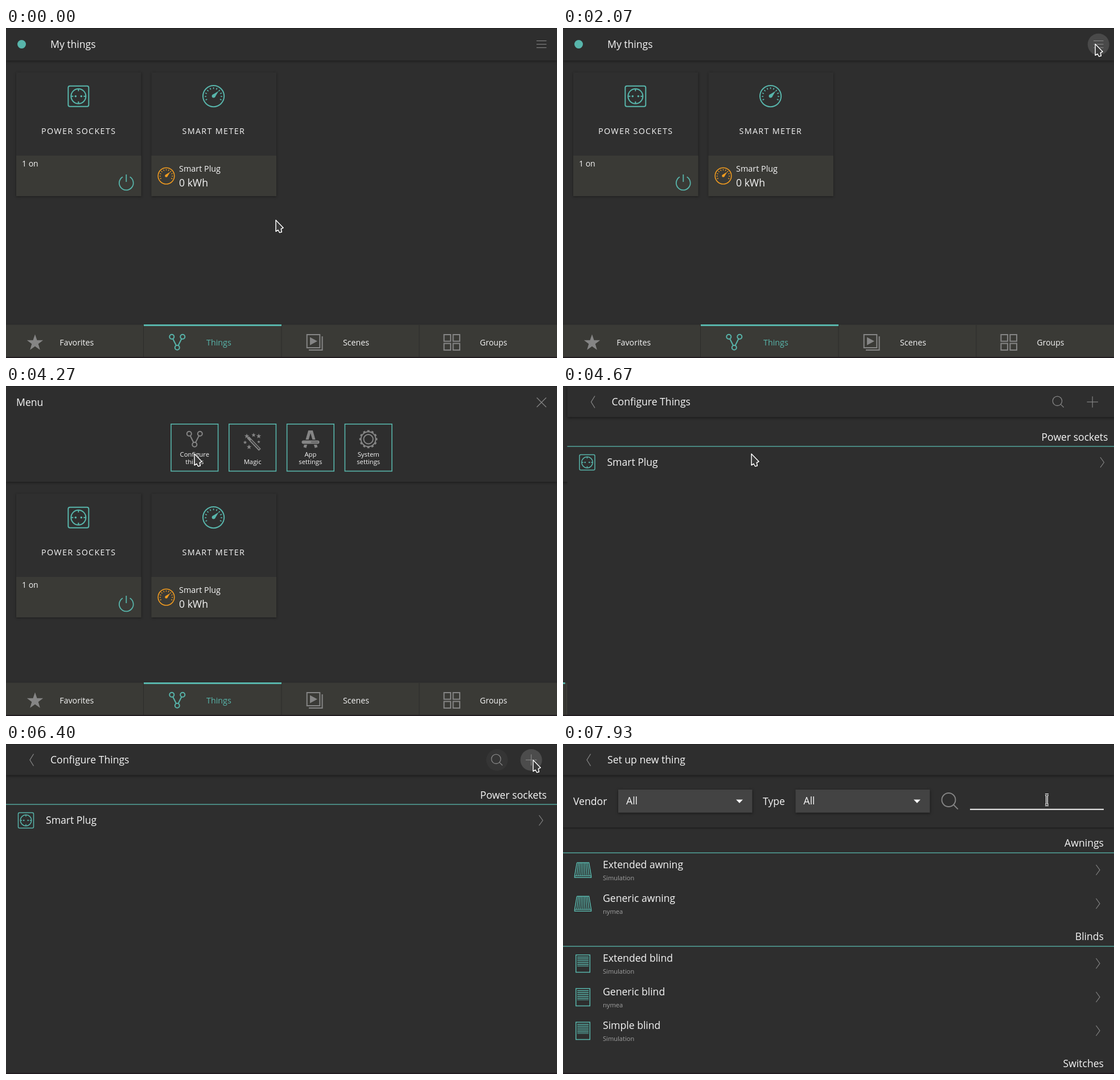
Write an HTML page with a canvas that moves like this. It is 968x579 px and loops after 8000 ms.

```html
<!DOCTYPE html>
<html lang="en">
<head>
<meta charset="utf-8">
<title>Smart home setup</title>
<style>
html, body { margin: 0; width: 100%; height: 100%; overflow: hidden; background: #2e2e2e; }
canvas { display: block; }
</style>
</head>
<body>
<canvas id="stage" width="968" height="579"></canvas>
<script>
const W = 968, H = 579, LOOP = 8000;
const ctx = document.getElementById('stage').getContext('2d');
const BG = '#2e2e2e', PANEL = '#3a3a36', TEAL = '#58b5ab', ORANGE = '#f39c1f';
const GRAY = '#858585', WHITE = '#f6f6f6';
const FONT = '"Open Sans", "Noto Sans", sans-serif';

const clamp = v => Math.max(0, Math.min(1, v));
const span = (t, a, b) => clamp((t - a) / (b - a));
const smooth = p => p * p * (3 - 2 * p);
const outCubic = p => 1 - (1 - p) ** 3;

function text(s, x, y, size = 17.6, color = WHITE, align = 'left', spacing = 0) {
  ctx.font = size + 'px ' + FONT;
  ctx.letterSpacing = spacing + 'px';
  ctx.textAlign = align;
  ctx.fillStyle = color;
  ctx.fillText(s, x, y);
}

function rect(x, y, w, h, color) {
  ctx.fillStyle = color;
  ctx.fillRect(x, y, w, h);
}

function box(x, y, w, h, color, lw = 2) {
  ctx.strokeStyle = color;
  ctx.lineWidth = lw;
  ctx.strokeRect(x, y, w, h);
}

function line(color, lw, ...p) {
  ctx.strokeStyle = color;
  ctx.lineWidth = lw;
  ctx.beginPath();
  for (let i = 0; i < p.length; i += 2) ctx.lineTo(p[i], p[i + 1]);
  ctx.stroke();
}

function poly(color, ...p) {
  ctx.fillStyle = color;
  ctx.beginPath();
  for (let i = 0; i < p.length; i += 2) ctx.lineTo(p[i], p[i + 1]);
  ctx.closePath();
  ctx.fill();
}

function ring(x, y, r, color, lw = 2, a = 0, b = Math.PI * 2) {
  ctx.strokeStyle = color;
  ctx.lineWidth = lw;
  ctx.beginPath();
  ctx.arc(x, y, r, a, b);
  ctx.stroke();
}

function dot(x, y, r, color) {
  ctx.fillStyle = color;
  ctx.beginPath();
  ctx.arc(x, y, r, 0, Math.PI * 2);
  ctx.fill();
}

function star(x, y, r, color, inner = 0.42) {
  const p = [];
  for (let i = 0; i < 10; i++) {
    const a = -Math.PI / 2 + i * Math.PI / 5, d = i % 2 ? r * inner : r;
    p.push(x + d * Math.cos(a), y + d * Math.sin(a));
  }
  poly(color, ...p);
}

function at(x, y, k, draw) {
  ctx.save();
  ctx.translate(x, y);
  ctx.scale(k, k);
  draw();
  ctx.restore();
}

function shaded(x, y, w, h, color, blur = 5, alpha = 0.5) {
  ctx.save();
  ctx.shadowColor = `rgba(0,0,0,${alpha})`;
  ctx.shadowBlur = blur;
  ctx.shadowOffsetY = 1;
  rect(x, y, w, h, color);
  ctx.restore();
}

// Icons
const socket = (x, y, k) => at(x, y, k, () => {
  ctx.strokeStyle = TEAL;
  ctx.lineWidth = 2;
  ctx.beginPath();
  ctx.roundRect(-18, -18, 36, 36, 3);
  ctx.stroke();
  ring(0, 0, 13, TEAL);
  for (let i = 0; i < 4; i++) {
    const c = Math.cos(i * Math.PI / 2), s = Math.sin(i * Math.PI / 2);
    line(TEAL, 2, 9 * c, 9 * s, 13 * c, 13 * s);
  }
  dot(-5, 0, 1.8, TEAL);
  dot(5, 0, 1.8, TEAL);
});

const gauge = (x, y, k, color) => at(x, y, k, () => {
  ring(0, 0, 18.6, color);
  for (let i = 0; i <= 10; i++) {
    const a = Math.PI * (0.86 + i * 0.128);
    const c = Math.cos(a), s = Math.sin(a);
    line(color, 1.6, 12.5 * c, 12.5 * s, 15.5 * c, 15.5 * s);
  }
  poly(color, 9, -9, 2.6, 1.6, -1.6, -2.6);
  dot(0, 0, 3, color);
});

const nodes = (x, y, color) => at(x, y, 1, () => {
  ring(-9.5, -9.5, 4, color);
  ring(9.5, -9.5, 4, color);
  ring(0, 9.5, 4, color);
  line(color, 2, -7.7, -6, -1.7, 6);
  line(color, 2, 7.7, -6, 1.7, 6);
});

function power(x, y) {
  ring(x, y, 12.4, TEAL, 1.8, -Math.PI * 0.33, Math.PI * 1.33);
  line(TEAL, 1.8, x, y - 15, x, y - 2);
}

function wand(x, y) {
  line(GRAY, 5, x - 8, y - 7, x + 13, y + 15);
  line(BG, 1.6, x - 3, y - 2, x + 12, y + 13.5);
  star(x - 10, y - 9, 4.5, GRAY);
  star(x + 2, y - 11, 4, GRAY);
  star(x + 11, y - 9, 4.5, GRAY);
  star(x - 13, y + 2, 3.5, GRAY);
  star(x - 6, y + 10, 4.5, GRAY);
  star(x + 11, y + 1, 3, GRAY);
}

function letterA(x, y) {
  line(GRAY, 5, x - 10, y + 15, x - 2, y - 12.5, x + 2, y - 12.5, x + 10, y + 15);
  rect(x - 16, y + 1, 32, 9, BG);
  ctx.fillStyle = GRAY;
  ctx.beginPath();
  ctx.roundRect(x - 15.5, y + 2.5, 31, 6, 3);
  ctx.fill();
  rect(x + 1, y + 4, 12, 3, '#6c6c6c');
}

function gear(x, y) {
  ring(x, y, 13, GRAY, 2);
  ring(x, y, 8.2, GRAY, 2);
  for (let i = 0; i < 12; i++) {
    const a = i * Math.PI / 6;
    ring(x, y, 14.6, GRAY, 2.6, a - 0.13, a + 0.13);
  }
}

function search(x, y, k) {
  at(x, y, k, () => {
    ring(0, 0, 8.2, GRAY, 1.3);
    line(GRAY, 1.3, 5.8, 5.8, 11.2, 11.2);
  });
}

function awning(y) {
  line(TEAL, 1.5, 24.5, y - 13, 45.5, y - 13, 49.5, y + 10, 49.5, y + 13, 20.5, y + 13, 20.5, y + 10, 24.5, y - 13);
  line(TEAL, 1.2, 20.5, y + 10, 49.5, y + 10);
  for (let i = 1; i < 8; i++) line(TEAL, 1.4, 24.5 + i * 2.62, y - 13, 20.5 + i * 3.62, y + 10);
}

function blind(y) {
  box(22.7, y - 15.2, 24.6, 30.4, TEAL, 1.5);
  for (let i = 0; i < 5; i++) line(TEAL, 1.5, 25, y - 11.5 + i * 3.3, 45, y - 11.5 + i * 3.3);
  line(TEAL, 1, 25, y + 4.5, 45, y + 4.5);
}

const back = () => line(GRAY, 1.3, 48.5, 17.5, 42, 28, 48.5, 38.5);
const chevron = y => line(GRAY, 1.2, 936.5, y - 9, 943, y, 936.5, y + 9);
const halo = (x, y, a) => { if (a > 0) dot(x, y, 19, `rgba(255,255,255,${a})`); };

// Pages
function tiles(dy) {
  for (const x of [18, 255.5]) {
    shaded(x, 78 + dy, 219.5, 217, '#2f2f2f', 4, 0.4);
    rect(x, 224 + dy, 219.5, 71, PANEL);
  }
  socket(127.3, 119.8 + dy, 1);
  text('POWER SOCKETS', 62, 186 + dy, 14.3, WHITE, 'left', 1.35);
  text('1 on', 28, 242.5 + dy, 14);
  power(211.3, 272 + dy);
  gauge(364.6, 119.6 + dy, 1, TEAL);
  text('SMART METER', 309.5, 186 + dy, 14.3, WHITE, 'left', 1.35);
  gauge(281.5, 259.5 + dy, 0.77, ORANGE);
  text('Smart Plug', 304, 251.7 + dy, 14.4);
  text('0 kWh', 304, 277.7 + dy, 17.6);
}

function menuButtons() {
  const labels = [['Configure', 'things'], ['', 'Magic'], ['App', 'settings'], ['System', 'settings']];
  labels.forEach(([a, b], i) => {
    const x = 331.3 + i * 101.8;
    box(x - 41.3, 66.8, 82.6, 82.6, TEAL, 1.6);
    text(a, x, 124, 11.3, WHITE, 'center');
    text(b, x, i === 1 ? 136.5 : 137.3, 11.3, WHITE, 'center');
  });
  nodes(331.3, 93.3, GRAY);
  wand(433, 97);
  letterA(535, 93);
  gear(636.6, 93.3);
}

function tabs() {
  shaded(0, 520.5, W, 56.5, PANEL, 4, 0.4);
  for (const x of [241, 483.5, 725.5]) rect(x, 521, 1, 56, '#2c2c2a');
  rect(242, 520, 242, 3, TEAL);
  star(51, 552.5, 15, GRAY, 0.4);
  nodes(300.8, 551.3, TEAL);
  box(528.7, 538, 22.6, 23, GRAY, 2);
  line(GRAY, 2, 555.6, 541, 555.6, 565, 532, 565);
  poly(GRAY, 534, 542.5, 547, 549.5, 534, 556.5);
  for (const x of [769.5, 785.5]) for (const y of [538, 553.5]) box(x, y, 11.6, 11.6, GRAY, 2);
  text('Favorites', 94.3, 557, 14.2);
  text('Things', 352, 557, 14.3, TEAL);
  text('Scenes', 592, 557, 14.2);
  text('Groups', 832.5, 557, 14);
}

function home(t) {
  const open = smooth(span(t, 2370, 2640)), dy = 111 * open, isMenu = t >= 2400;
  rect(0, 0, W, H, BG);
  tiles(dy);
  shaded(0, 0, W, 57 + dy, BG);
  if (isMenu) {
    ctx.save();
    ctx.beginPath();
    ctx.rect(0, 0, W, 57 + dy);
    ctx.clip();
    text('Menu', 18, 35, 17.6);
    menuButtons();
    ctx.restore();
  } else {
    dot(27.5, 28.5, 7.5, TEAL);
    text('My things', 78, 35);
  }
  halo(940.7, 28.8, 0.13 * span(t, 1820, 1950) * (1 - span(t, 2900, 3150)));
  if (isMenu) {
    line(GRAY, 1.2, 932.5, 20.5, 949, 37);
    line(GRAY, 1.2, 949, 20.5, 932.5, 37);
  } else {
    for (const y of [22.5, 28.5, 34.5]) line(GRAY, 1.1, 932, y, 949.5, y);
  }
  tabs();
}

function header(title) {
  shaded(0, 0, W, 54.5, BG);
  back();
  text(title, 78, 34);
}

function configure(t) {
  rect(0, 0, W, H, BG);
  header('Configure Things');
  halo(862.7, 28, 0.1 * span(t, 6100, 6170) * (1 - span(t, 6230, 6480)));
  halo(922.7, 28, 0.14 * span(t, 6240, 6340) + 0.07 * span(t, 6840, 6930));
  search(861, 26.3, 1);
  line(GRAY, 1.2, 913, 28, 932.5, 28);
  line(GRAY, 1.2, 922.7, 18.2, 922.7, 37.8);
  text('Power sockets', 950, 95.5, 17.6, WHITE, 'right');
  rect(0, 105.3, W, 1.3, TEAL);
  socket(35, 134, 0.75);
  text('Smart Plug', 70, 140);
  chevron(134);
}

function combo(x, w) {
  shaded(x, 80, w, 40.5, '#434343', 4, 0.5);
  text('All', x + 14, 106.3);
  poly(WHITE, x + w - 28.5, 97.5, x + w - 16.5, 97.5, x + w - 22.5, 103.7);
}

const sections = [
  ['Awnings', awning, [['Extended awning', 'Simulation'], ['Generic awning', 'nymea']]],
  ['Blinds', blind, [['Extended blind', 'Simulation'], ['Generic blind', 'nymea'], ['Simple blind', 'Simulation']]],
  ['Switches', null, []]
];

function setup() {
  rect(0, 0, W, H, BG);
  shaded(0, 55, W, 91.5, BG, 3, 0.45);
  header('Set up new thing');
  text('Vendor', 18, 106.7);
  combo(97, 235.5);
  text('Type', 351, 106.7);
  combo(408.5, 236);
  search(677.5, 98, 1.46);
  rect(715, 113.7, 235, 2, WHITE);
  let y = 147;
  for (const [name, icon, rows] of sections) {
    text(name, 950, y + 33, 17.6, WHITE, 'right');
    rect(0, y + 43.3, W, 1.3, TEAL);
    y += 44;
    for (const [title, vendor] of rows) {
      icon(y + 30.3);
      text(title, 70, y + 26.7);
      text(vendor, 70, y + 48, 11.1, '#a0a0a0');
      chevron(y + 30);
      y += 59;
    }
    y += 2;
  }
}

function push(from, to, t, start) {
  const p = outCubic(span(t, start, start + 400));
  const draw = (page, x) => at(x, 0, 1, () => page(t));
  if (p < 1) draw(from, -W / 2 * p);
  draw(to, W * (1 - p));
}

// Pointer: time, x, y
const path = [
  [2690, 935, 28], [2930, 890, 52], [3200, 732, 98], [3600, 500, 122], [4030, 331, 119],
  [5160, 331, 119], [5600, 540, 104], [6000, 800, 60], [6150, 866, 42], [6340, 926, 28],
  [7350, 926, 28], [7600, 890, 62], [7880, 850, 98]
];

function pointer(t) {
  if (t < 2690) {
    const p = smooth(span(t, 700, 1980));
    return [474 + 461 * p, 337 - 309 * p];
  }
  const last = path.length - 1;
  if (t >= path[last][0]) return path[last].slice(1);
  const i = path.findIndex(k => k[0] > t) - 1;
  const a = path[i], b = path[i + 1], d = b[0] - a[0], u = (t - a[0]) / d;
  const still = (p, q) => p[1] === q[1] && p[2] === q[2];
  const slope = (j, c) => {
    const p = path[j - 1], q = path[j + 1], k = path[j];
    return !p || !q || still(p, k) || still(k, q) ? 0 : (q[c] - p[c]) / (q[0] - p[0]);
  };
  return [1, 2].map(c => {
    const e = smooth(u);
    return a[c] + (b[c] - a[c]) * e + d * u * (1 - u) * (slope(i, c) * (1 - u) - slope(i + 1, c) * u);
  });
}

function cursor(t) {
  const [x, y] = pointer(t);
  if (t > 7130 && y > 80) {
    at(x, y, 1, () => {
      for (const [c, w] of [[WHITE, 4], ['#2a2a2a', 1.4]]) {
        line(c, w, 0, -9, 0, 9);
        line(c, w, -3, -9, 3, -9);
        line(c, w, -3, 9, 3, 9);
      }
    });
    return;
  }
  at(x, y, 1, () => {
    ctx.beginPath();
    for (const [px, py] of [[0, 0], [0, 20], [4, 17.5], [6.5, 22], [10.5, 21], [9.3, 15.5], [13.2, 13.5]]) ctx.lineTo(px, py);
    ctx.closePath();
    ctx.lineJoin = 'round';
    ctx.lineWidth = 3;
    ctx.strokeStyle = 'rgba(20,20,20,.6)';
    ctx.stroke();
    ctx.fillStyle = '#3a3a3a';
    ctx.fill();
    ctx.lineWidth = 1.5;
    ctx.strokeStyle = '#fff';
    ctx.stroke();
    ctx.lineJoin = 'miter';
  });
}

function render(t) {
  ctx.clearRect(0, 0, W, H);
  if (t < 4530) home(t);
  else if (t < 7130) push(home, configure, t, 4350);
  else push(configure, setup, t, 6950);
  rect(0, 0, W, 1, '#222');
  rect(0, 577, W, 2, '#211c20');
  cursor(t);
}

const begin = performance.now();
function frame() {
  render((performance.now() - begin) % LOOP);
  requestAnimationFrame(frame);
}
frame();
</script>
</body>
</html>
```
